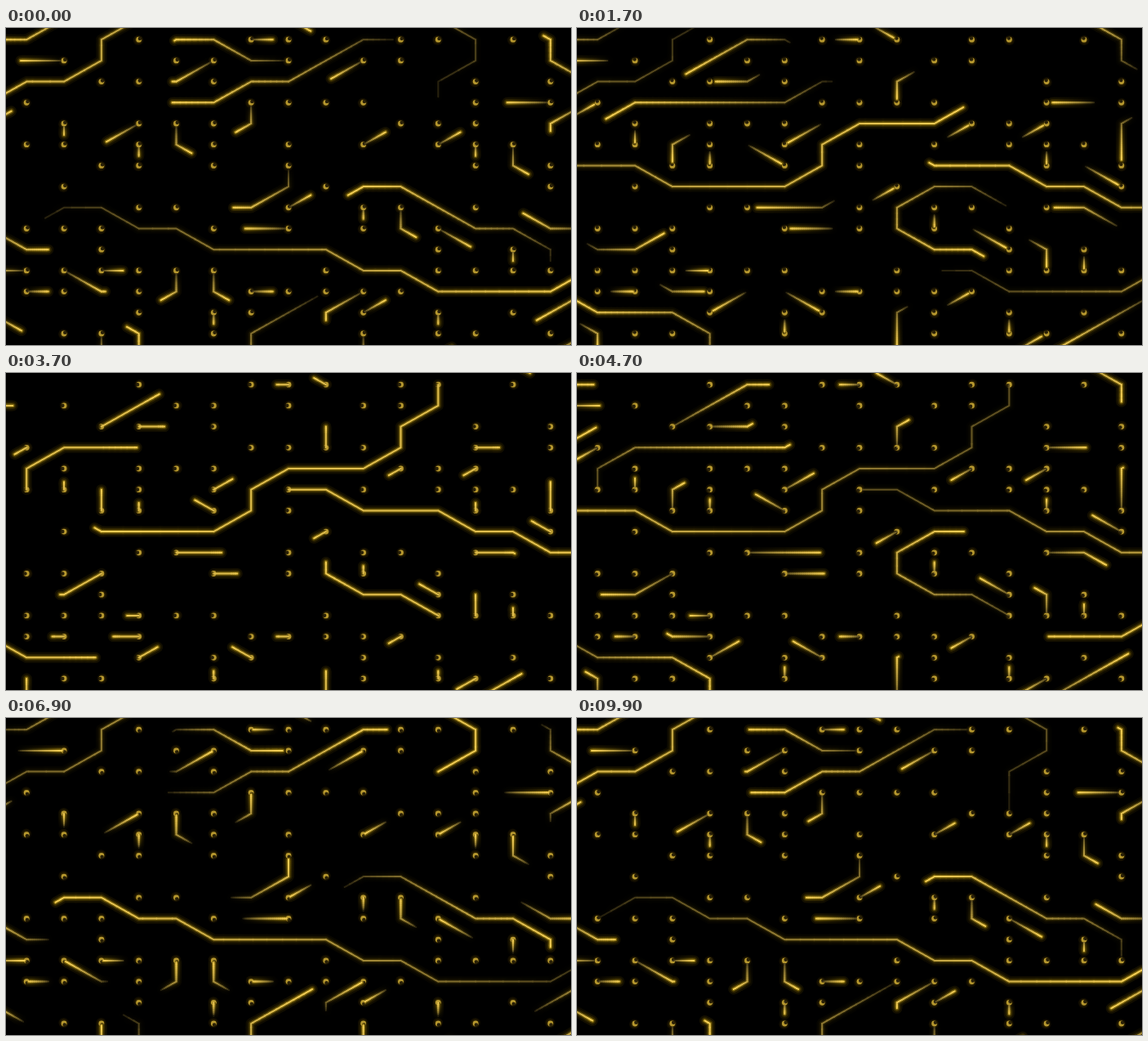
Animation, 692 px wide and 388 px high, one loop 10000 ms. Source, as an HTML page with a canvas:

```html
<!DOCTYPE html>
<html lang="en">
<head>
<meta charset="utf-8">
<title>Circuit pulses</title>
<style>
html, body { margin: 0; width: 100%; height: 100%; overflow: hidden; background: #000; }
canvas { display: block; }
</style>
</head>
<body>
<canvas id="stage" width="692" height="388"></canvas>
<script>
const ctx = document.getElementById('stage').getContext('2d');
const LOOP = 10, TRIP = 5, LEAVE = 7.06, FADE = 2.87, LEVELS = 40, STEP = 2.5;
const DX = 45.83, DY = 25.7;
const place = ([c, r]) => [25.2 + c * DX, 14.2 + r * DY];
const mod = (a, n) => ((a % n) + n) % n;
const cells = text => text.split(' ').map(cell => cell.split(',').map(Number));

// Moves: l r u d are straight, q e z c go up-left, up-right, down-left, down-right.
const MOVES = {
  l: [-1, 0], r: [1, 0], u: [0, -1], d: [0, 1],
  q: [-1, -1], e: [1, -1], z: [-1, 1], c: [1, 1]
};

// Routes by shape, with the cells they start from.
const ROUTES = {
  ll: '1,1 14,3 7,9 0,11',
  d: '1,4 3,5 12,5 9,8 13,10 5,13 11,13',
  r: '6,0 2,11 0,12 6,12',
  c: '7,-1',
  e: '-1,4 9,5 11,5 7,8 9,13',
  dc: '4,4 13,5 10,8 5,11',
  dz: '6,3 4,11',
  zd: '9,1 3,4',
  zl: '5,1',
  cd: '11,9 -1,13',
  cr: '1,11',
  zdd: '9,12 15,3',
  lql: '15,9',
  dcre: '-1,8',
  dzll: '7,6',
  lqlzz: '7,1',
  lzzlzllllzd: '10,0',
  uqlqqlzdcrc: '14,11'
};

// Routes that run off stage: shape, start, hidden length before it, full length.
const OPEN_ROUTES = [
  ['zll', '1,-1', 132, 400],
  ['zdzlz', '3,-1', 544, 1530],
  ['uueuq', '11,4', 0, 1590],
  ['quq', '15,2', 60, 250],
  ['lqlqllql', '15,8', 874, 1260],
  ['ercrcrrrcrcrrre', '0,9', 0, 1240],
  ['rrcrrreuerreueu', '-1,6', 940, 1600],
  ['zzz', '15,12', 75, 250],
  ['e', '11,15', 26, 78],
  ['z', '15,14', 0, 104],
  ['zzd', '8,12', 0, 560],
  ['uqllq', '3,15', 258, 510],
  ['d', '2,14', 0, 100],
  ['d', '9,14', 0, 100]
];

const dots = cells('3,0 13,0 4,1 10,1 5,2 12,2 14,2 7,3 9,3 5,4 1,7 3,8 1,9 2,10 8,11 13,13 1,14 14,14').map(place);
const slices = [];

function addRoute(shape, start, before = 0, total = 0) {
  const points = [place(start)];
  let [c, r] = start;
  for (const key of shape) {
    c += MOVES[key][0];
    r += MOVES[key][1];
    points.push(place([c, r]));
  }
  dots.push(points[0], points[points.length - 1]);

  const spans = points.slice(1).map(([x, y], i) => Math.hypot(x - points[i][0], y - points[i][1]));
  const full = total || spans.reduce((a, b) => a + b);
  let along = before;
  spans.forEach((span, i) => {
    const [x0, y0] = points[i], [x1, y1] = points[i + 1];
    const n = Math.ceil(span / STEP);
    const at = k => [x0 + (x1 - x0) * k / n, y0 + (y1 - y0) * k / n];
    for (let k = 0; k < n; k++) {
      slices.push({ from: at(k), to: at(k + 1), u: (along + span * (k + 0.5) / n) / full });
    }
    along += span;
  });
}

for (const shape in ROUTES) cells(ROUTES[shape]).forEach(start => addRoute(shape, start));
for (const [shape, start, before, total] of OPEN_ROUTES) addRoute(shape, cells(start)[0], before, total);

// The outward and the returning pass each leave a fading trail; the two add up.
const trail = age => Math.max(0, 1 - mod(age, LOOP) / FADE);
const glow = (u, t) => trail(t - LEAVE - TRIP * u) + trail(t - LEAVE + TRIP * u);

// Stroke width, colour at glow 1 and falloff, from halo to core.
const LAYERS = [
  [13, [20, 15, 0], 1.1],
  [8.5, [50, 39, 0], 1.1],
  [4.8, [122, 99, 10], 1],
  [2, [245, 207, 85], 0.5]
];

function drawTrails(t) {
  const bands = Array.from({ length: 2 * LEVELS + 1 }, () => new Path2D());
  for (const { from, to, u } of slices) {
    const band = bands[Math.round(glow(u, t) * LEVELS)];
    band.moveTo(...from);
    band.lineTo(...to);
  }
  ctx.globalCompositeOperation = 'lighten';
  ctx.lineCap = 'round';
  for (const [width, colour, falloff] of LAYERS) {
    ctx.lineWidth = width;
    bands.forEach((band, i) => {
      if (!i) return;
      const light = (i / LEVELS) ** falloff;
      ctx.strokeStyle = `rgb(${colour.map(v => Math.min(255, Math.round(v * light)))})`;
      ctx.stroke(band);
    });
  }
}

function disc(x, y, radius, colour) {
  ctx.fillStyle = colour;
  ctx.beginPath();
  ctx.arc(x, y, radius, 0, Math.PI * 2);
  ctx.fill();
}

function drawDots(t) {
  const turn = Math.PI * (0.75 - 2 * t / LOOP);
  const dx = Math.cos(turn), dy = Math.sin(turn);
  for (const [x, y] of dots) {
    disc(x + dx, y + dy, 6.2, '#120d00');
    disc(x + dx * 0.6, y + dy * 0.6, 4.6, '#2a2000');
    disc(x, y, 3.4, '#b8992f');
    disc(x - dx * 1.8, y - dy * 1.8, 2.3, 'rgba(16,12,0,0.85)');
  }
}

let begin;
function frame(now) {
  begin ??= now;
  const t = Math.floor((now - begin) / 100) / 10 % LOOP;
  ctx.globalCompositeOperation = 'source-over';
  ctx.fillStyle = '#000';
  ctx.fillRect(0, 0, 692, 388);
  drawDots(t);
  drawTrails(t);
  requestAnimationFrame(frame);
}
requestAnimationFrame(frame);
</script>
</body>
</html>
```
